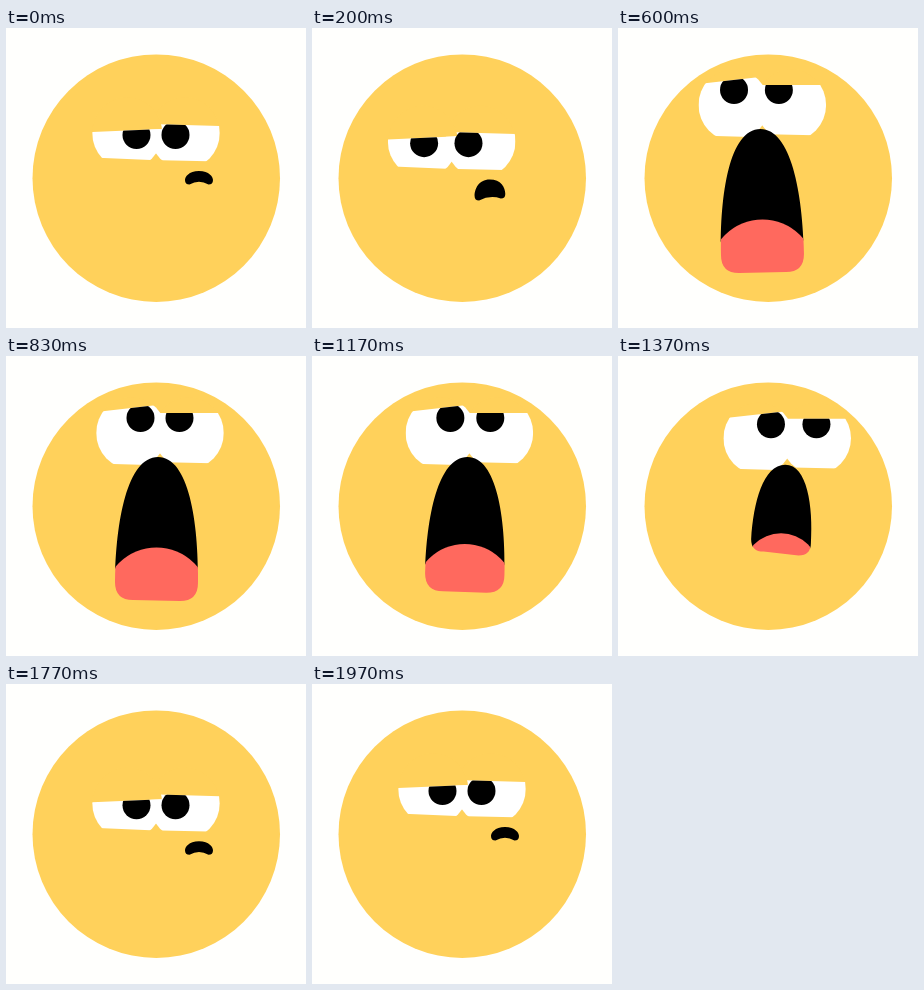
Write an HTML page with a canvas that moves like this. It is 300 px wide and 300 px high and loops after 2010 ms.

```html
<!DOCTYPE html>
<html lang="en">
<head>
<meta charset="utf-8">
<title>Yawning face</title>
<style>
  html, body { margin: 0; width: 100%; height: 100%; overflow: hidden; background: #fffffd; }
  canvas { display: block; width: 300px; height: 300px; }
</style>
</head>
<body>
<canvas id="stage"></canvas>
<script>
const LOOP = 2010;
const YELLOW = '#ffd15b', PINK = '#ff695e', WHITE = '#ffffff', BLACK = '#000000', PAPER = '#fffffd';
const EYE_RX = 35, EYE_RY = 36, EYE_GAP = 28.8, PUPIL = 14, PUPIL_GAP = 19.5;
const REST_X = 150, REST_Y = 105;

const canvas = document.getElementById('stage');
const ctx = canvas.getContext('2d');
const ratio = window.devicePixelRatio || 1;
canvas.width = canvas.height = 300 * ratio;
ctx.scale(ratio, ratio);

const progress = (t, from, to) => Math.min(1, Math.max(0, (t - from) / (to - from)));
const smooth = u => u * u * (3 - 2 * u);
const ramp = (t, from, to) => smooth(progress(t, from, to));

// Starts at a value, then eases to each [from, to, value] in turn.
const travel = (t, start, ...moves) =>
  moves.reduce((now, [from, to, value]) => now + (value - now) * ramp(t, from, to), start);

function poseAt(t) {
  const opening = ramp(t, 150, 530);
  return {
    x: travel(t, REST_X, [0, 380, 131], [380, 780, 154], [1050, 1500, 173], [1500, 1770, REST_X]),
    y: travel(t, REST_Y, [0, 290, 116], [290, 600, 77], [1300, 1650, 126], [1650, 1970, REST_Y]),
    gaze: travel(t, 0, [0, 400, -16], [400, 830, 0], [1100, 1400, 10], [1400, 1720, 0]),
    eyes: opening * (1 - ramp(t, 1330, 1640)),
    yawn: opening * (1 - Math.pow(progress(t, 1070, 1570), 1.7))
  };
}

function ellipse(x, y, rx, ry = rx) {
  ctx.beginPath();
  ctx.ellipse(x, y, rx, ry, 0, 0, Math.PI * 2);
}

function disc(x, y, r, color) {
  ellipse(x, y, r);
  ctx.fillStyle = color;
  ctx.fill();
}

// Band between two slanted edges; each edge is [left y, right y].
function band(x, top, bottom) {
  ctx.beginPath();
  ctx.moveTo(x - EYE_RX, top[0]);
  ctx.lineTo(x + EYE_RX, top[1]);
  ctx.lineTo(x + EYE_RX, bottom[1]);
  ctx.lineTo(x - EYE_RX, bottom[0]);
  ctx.closePath();
}

function drawEye({ x, y, top, bottom }) {
  ctx.save();
  ellipse(x, y, EYE_RX, EYE_RY);
  ctx.clip();
  band(x, [y - 40, y - 40], top);
  ctx.fillStyle = YELLOW;
  ctx.fill();
  band(x, top, bottom);
  ctx.fillStyle = WHITE;
  ctx.fill();
  ctx.restore();
}

function drawPupil({ x, top, bottom, pupilX, pupilY }) {
  ctx.save();
  band(x, top, bottom);
  ctx.clip();
  disc(pupilX, pupilY, PUPIL, BLACK);
  ctx.restore();
}

function drawEyes({ x, y, gaze, eyes }) {
  const pupilY = y + 2 - 17 * Math.pow(eyes, 1.25);
  // The pupil on the side looked at moves further.
  const left = {
    x: x - EYE_GAP, y, pupilY,
    pupilX: x - PUPIL_GAP + (gaze < 0 ? gaze : gaze / 3),
    top: [y - 1 - 20 * eyes, y - 4 - 25 * eyes],
    bottom: [y + 24.5 + 6 * eyes, y + 27.5 + 5 * eyes]
  };
  const right = {
    x: x + EYE_GAP, y, pupilY,
    pupilX: x + PUPIL_GAP + (gaze > 0 ? gaze : gaze / 3),
    top: [y - 9 - 11 * eyes, y - 7 - 13 * eyes],
    bottom: [y + 27 + 2 * eyes, y + 28.5 + 2 * eyes]
  };
  drawEye(right);
  drawEye(left);
  drawPupil(left);
  drawPupil(right);
}

// Arch on a leaning axis, with rounded lower corners.
function mouthPath({ topX, topY, height, width, lean, tilt, frown }) {
  const half = width / 2, middle = topX + lean, floor = topY + height;
  const r = Math.min(18, Math.max(4.5, height * .14));
  const rise = .55 * height, shift = lean * .55, shoulder = .74 * half;
  const left = middle - half, right = middle + half;
  const leftY = floor - tilt, rightY = floor + tilt;

  const path = new Path2D();
  path.moveTo(left, leftY - r);
  path.bezierCurveTo(left - shift, leftY - rise, topX - shoulder, topY, topX, topY);
  path.bezierCurveTo(topX + shoulder, topY, right - shift, rightY - rise, right, rightY - r);
  path.quadraticCurveTo(right, rightY, right - r, rightY);
  path.quadraticCurveTo(middle, floor - frown, left + r, leftY);
  path.quadraticCurveTo(left, leftY, left, leftY - r);
  path.closePath();
  return path;
}

function fillWithin(region, path, color) {
  ctx.save();
  ctx.clip(region, 'evenodd');
  ctx.fillStyle = color;
  ctx.fill(path);
  ctx.restore();
}

function drawMouth({ x, y, eyes, yawn }) {
  const turn = x - REST_X;
  const lift = Math.max(0, (REST_Y - y) / 28);
  const height = 13.5 + 130 * yawn, width = 28 + 55 * yawn;
  const topX = x - 2 + 45 * Math.pow(1 - eyes, 2.3);
  const topY = y + 38 - 14 * lift;
  const lean = -.38 * turn * yawn;
  const frown = 7 * Math.max(0, 1 - height / 60);
  const mouth = mouthPath({ topX, topY, height, width, lean, tilt: turn * .1, frown });

  const tongue = Math.max(-5, (height - 55) * .6);
  const radius = .64 * width;
  const tongueX = topX + lean, tongueY = topY + height - tongue + radius;
  const inside = new Path2D(), outside = new Path2D();
  inside.arc(tongueX, tongueY, radius, 0, Math.PI * 2);
  outside.rect(0, 0, 300, 300);
  outside.moveTo(tongueX + radius - 1, tongueY);
  outside.arc(tongueX, tongueY, radius - 1, 0, Math.PI * 2);
  fillWithin(outside, mouth, BLACK);
  if (tongue > 0) fillWithin(inside, mouth, PINK);
}

function draw(t) {
  const pose = poseAt(t);
  ctx.fillStyle = PAPER;
  ctx.fillRect(0, 0, 300, 300);
  disc(150.25, 150.2, 123.75, YELLOW);
  drawEyes(pose);
  drawMouth(pose);
}

const start = performance.now();
function tick() {
  draw((performance.now() - start) % LOOP);
  requestAnimationFrame(tick);
}
tick();
</script>
</body>
</html>
```
